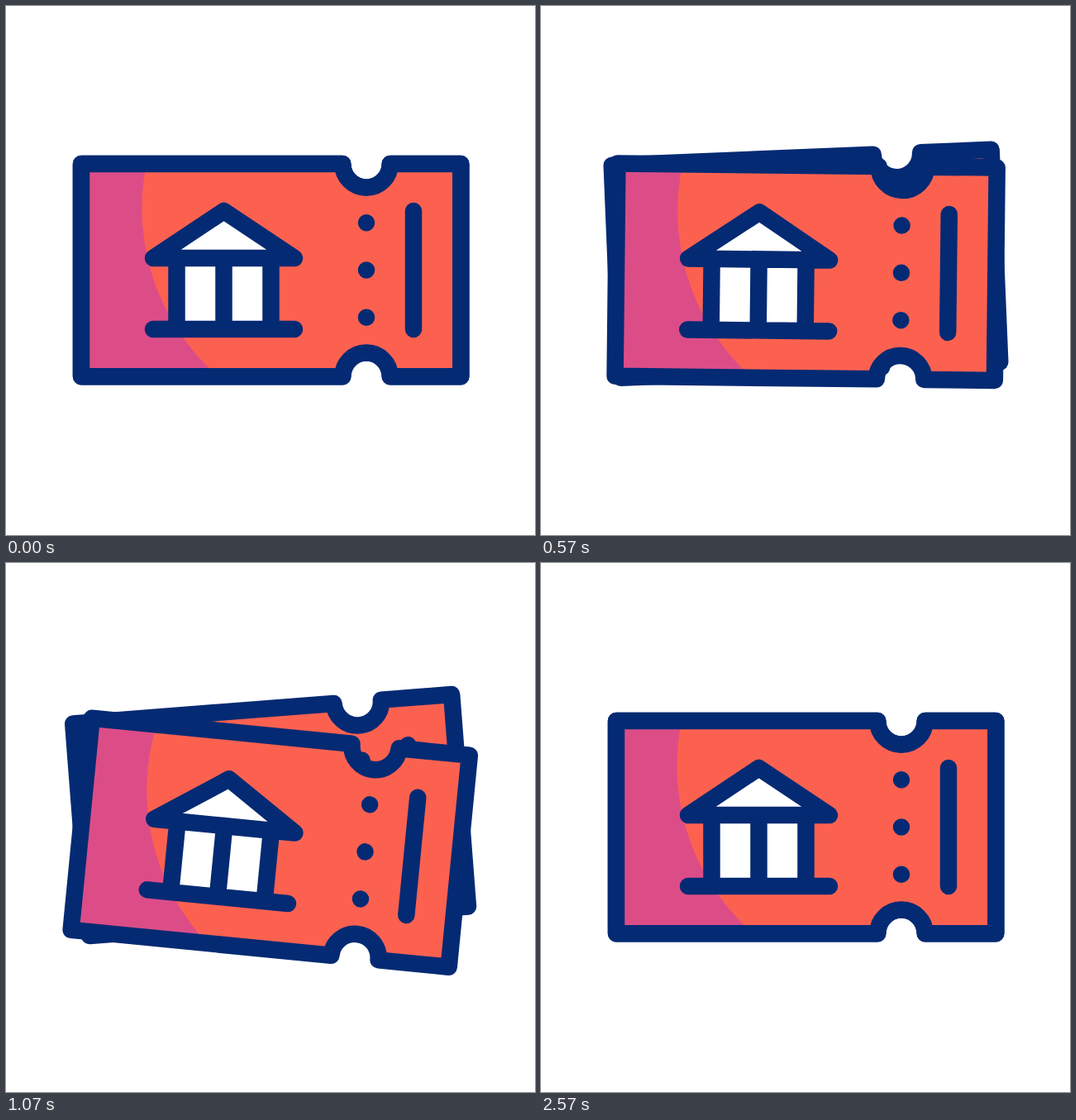
An HTML page for the animation above (2.83 s loop, 640 by 640 pixels).

```html
<!DOCTYPE html>
<html lang="en">
<head>
<meta charset="utf-8">
<title>Museum tickets</title>
<style>
  html, body { margin: 0; width: 100%; height: 100%; overflow: hidden; background: #fff; }
  svg { display: block; width: 100%; height: 100%; }
  .ink { fill: none; stroke: #042a73; stroke-width: 20.5; stroke-linecap: round; stroke-linejoin: round; }
  .glow { fill: none; stroke: #ffca50; stroke-width: 23; stroke-linecap: round; }
</style>
</head>
<body>
<svg viewBox="0 0 640 640">
  <defs>
    <path id="edge" d="M91 191H407.3A28.7 28.7 0 0 0 464.7 191H550.3V448.3H464.7A28.7 28.7 0 0 0 407.3 448.3H91Z"/>
    <clipPath id="inside"><use href="#edge"/></clipPath>
    <g id="ticket">
      <use href="#edge" fill="#dc4d87"/>
      <circle cx="434.5" cy="245" r="270" fill="#fc6150" clip-path="url(#inside)"/>
      <path fill="#fff" d="M178 305L263.5 248L349 305H320.5V391H206.5V305Z"/>
      <g class="ink">
        <use href="#edge"/>
        <path d="M178 305L263.5 248L349 305ZM178 391H349M206.5 305V391M263.5 305V391M320.5 305V391"/>
        <path d="M436 262.2h.01M436 319.5h.01M436 376.8h.01M493 248V391"/>
      </g>
    </g>
  </defs>
  <use id="back" href="#ticket"/>
  <use id="front" href="#ticket"/>
  <g class="glow">
    <path class="dot" d="M436 376.8h.01"/>
    <path class="dot" d="M436 319.5h.01"/>
    <path class="dot" d="M436 262.2h.01"/>
    <path id="bar"/>
  </g>
</svg>
<script>
const LOOP = 2830, FPS = 30;
const KEYS = [0, 13.3, 22.6, 29.4, 40];
const SWING = { front: [0, 9, -15, 6.6, 0], back: [0, -9, 10, -5.2, 0] };
const dots = document.querySelectorAll('.dot');
const bar = document.getElementById('bar');

// Eased progress from 0 to 1 between two frames
function ease(frame, from, to) {
  const u = Math.min(1, Math.max(0, (frame - from) / (to - from)));
  return u * u * (3 - 2 * u);
}

function angleAt(frame, values) {
  return KEYS.slice(1).reduce((angle, key, i) =>
    angle + (values[i + 1] - values[i]) * ease(frame, KEYS[i], key), 0);
}

function draw(now) {
  // Small bias keeps rounded timestamps on the right step
  const frame = Math.floor((now % LOOP + 5) * FPS / 1000);

  for (const id in SWING) {
    document.getElementById(id)
      .setAttribute('transform', `rotate(${angleAt(frame, SWING[id])} 130 319.5)`);
  }

  // Each dot lights up as the one below it goes out
  dots.forEach((dot, i) => {
    const on = 37 + i * 8;
    dot.style.opacity = ease(frame, on, on + 4) - ease(frame, on + 8, on + 12);
  });

  const head = ease(frame, 56, 73), tail = ease(frame, 60, 77);
  bar.style.display = head > tail ? '' : 'none';
  bar.setAttribute('d', `M493 ${248 + 143 * tail}V${248 + 143 * head}`);
}

const start = performance.now();
function tick() {
  draw(performance.now() - start);
  requestAnimationFrame(tick);
}
tick();
</script>
</body>
</html>
```
